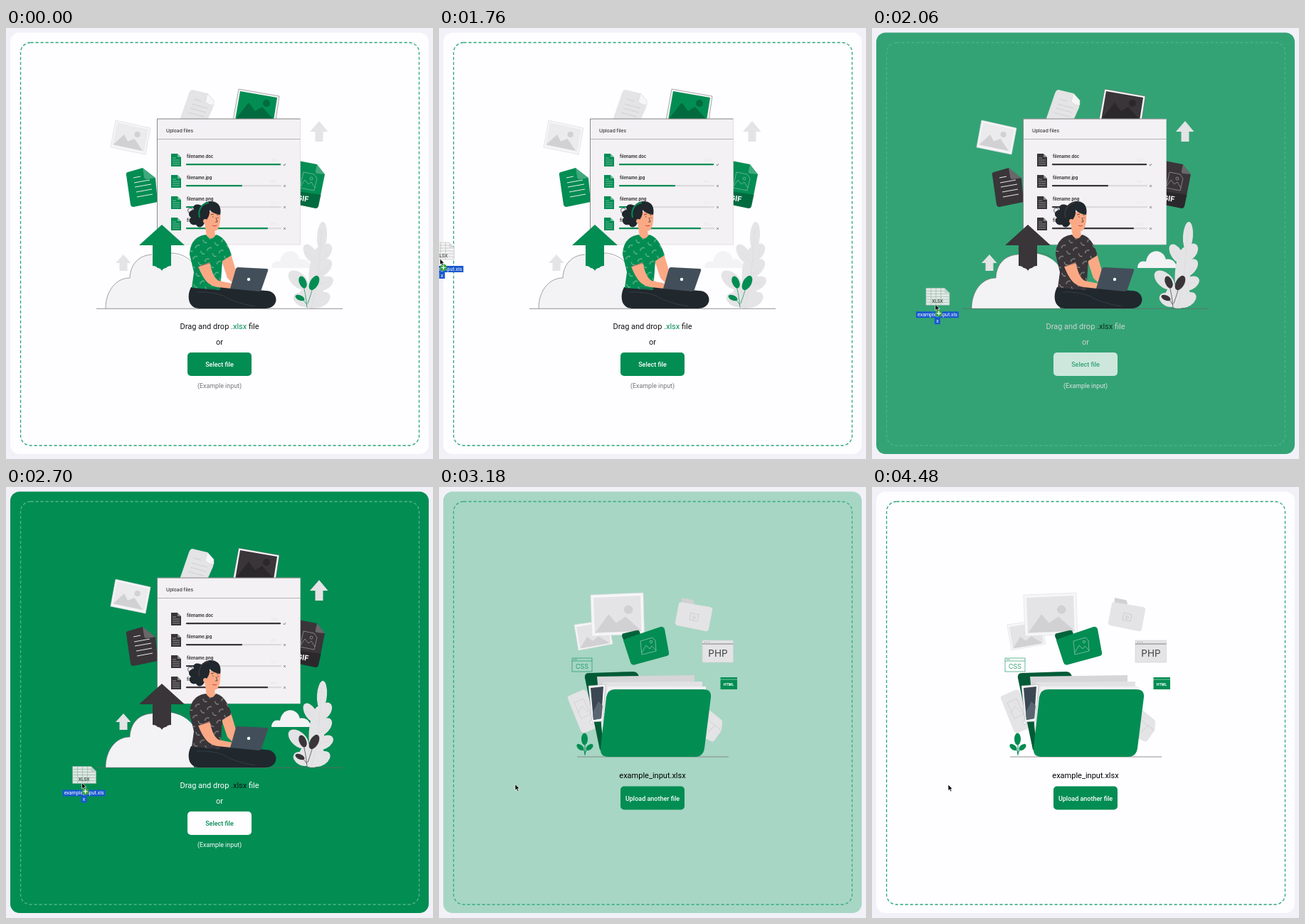
An HTML page that plays this animation: 600 px wide and 607 px high, repeating every 4.51 s.

```html
<!DOCTYPE html>
<html lang="en">
<head>
<meta charset="utf-8">
<title>File drop zone</title>
<style>
html, body { margin: 0; width: 100%; height: 100%; overflow: hidden; background: #f2f1f8; }
svg { display: block; width: 600px; height: 607px; font-family: Roboto, sans-serif; }
.mid { text-anchor: middle; }
.line { font-size: 11px; }
.btn { font-size: 9px; font-weight: 500; }
.geo { font-family: Inter, sans-serif; }
.a { fill: var(--accent); }
.as { stroke: var(--accent); }
.g { fill: #e4e3e5; }
.d { fill: #d1d0d3; }
.w { fill: #f6f5f7; }
.k { fill: #20272d; }
.s { fill: #fba985; }
.n { fill: none; }
</style>
</head>
<body>
<svg viewBox="0 0 600 607">
  <defs>
    <pattern id="curls" width="17" height="16" patternUnits="userSpaceOnUse" patternTransform="rotate(12)">
      <path class="n" d="M2 8a4 4 0 0 1 5-5M10 10a4 4 0 0 0 6 3" stroke="#d5ded8" stroke-width=".7"/>
    </pattern>
    <g id="scene">
      <path class="d" d="M0 30L13 12L20 21L29 15L44 30Z"/>
      <circle class="d" cx="32" cy="8" r="4.3"/>
    </g>
  </defs>
  <rect id="panel" x="6" y="6.500" width="588" height="593.500" rx="13"/>
  <rect id="dash" class="n" x="20.500" y="20.500" width="560" height="567.500" rx="14" stroke-width="1.300" stroke-dasharray="4.200 2.800"/>

  <g id="before">
    <path class="w" stroke="#dcdbde" stroke-width=".7" d="M154 130L203 141L196 178L147 168Z"/>
    <path fill="#ebeaec" d="M156 133L200 143L194 174L150 165Z"/>
    <use href="#scene" transform="matrix(.94 .2 -.18 .94 156 136)"/>

    <path class="g" d="M262 87L283 92L292 102L291 112L283 130H244L257 92Q259 87 262 87Z"/>
    <path class="w" stroke="#ccc" stroke-width=".5" d="M283 92L280 104Q285 109 292 109V102Z"/>
    <path class="n" stroke="#d0cfd2" d="M264 100L274 103M261 107L283 113M259 113L281 119M256 119L278 125"/>

    <path class="w" stroke="#555" stroke-width=".5" d="M327 86L384 96L379 130H319Z"/>
    <path class="a" d="M329 89L381 98L376 130H322Z"/>
    <g fill="#000" opacity=".24">
      <path d="M322 129L341 105L350 117L360 111L376 129Z"/>
      <circle cx="366" cy="106" r="5"/>
    </g>
    <path class="g" d="M440 131L452.500 146H445.500V160H434.500V146H427Z"/>

    <path class="a" d="M171 203L192 197L210 211L213 245L179 252Q176 252 175 249L169 207Q168 204 171 203Z"/>
    <path fill="#fff" opacity=".25" d="M192 197L210 211L198 213Q194 213 194 209Z"/>
    <path class="n" stroke="#e8ece9" d="M179 211L189 209M180 218L202 214M181 224L204 220M183 231L205 227M184 238L206 234"/>

    <path class="a" d="M411 187L437 192L448 206L439 251Q438 254 435 254L411 249Z"/>
    <path fill="#000" opacity=".24" d="M411 230L443 235L439 251Q438 254 435 254L411 249Z"/>
    <path fill="#fff" opacity=".25" d="M437 192L448 206L437 205Q434 204 435 201Z"/>
    <path class="n" stroke="#c5cfc9" stroke-width=".5" d="M418 203L433 206L437 212L433 229L413 225ZM414 223L420 214L425 220L429 217L434 225"/>
    <circle class="n" cx="429" cy="212" r="2" stroke="#c5cfc9" stroke-width=".5"/>
    <text class="geo" transform="translate(408 242.500)rotate(8)" font-size="10.500" font-weight="700" fill="#fff">GIF</text>

    <rect x="212.500" y="128" width="201" height="177" fill="#f3f1f4" stroke="#d2d1d4" stroke-width=".6"/>
    <path class="n" stroke="#666" stroke-width=".7" d="M212.500 305V128H413.500"/>
    <path stroke="#999" stroke-width=".7" d="M212.500 156.500H413.500"/>
    <text class="geo" x="225" y="147" font-size="6.700" font-weight="500" fill="#333">Upload files</text>
    <g id="rows"></g>

    <path fill="#f3f2f4" d="M373 338C373 330 379 327 385 329C388 310 409 310 413 326C421 324 428 330 428 338Z"/>
    <g id="bush" class="g"></g>
    <path class="n" stroke="#d6d5d8" stroke-width=".5" d="M444 282C440 320 440 360 429 394M440 330L452 318M438 348L453 337M436 362L454 358M437 330L422 315M431 376L405 351"/>
    <path class="n as" stroke-width=".7" d="M423 394C422 381 420 370 417 360M424 388Q429 374 432 362M423 390Q420 384 413 380"/>
    <g id="sprig" class="a"></g>

    <path fill="#f3f2f4" d="M140 395C140 371 154 352 174 352C175 331 188 320 205 319C231 313 252 320 264 337V395Z"/>
    <path class="n" stroke="#666" stroke-width=".6" d="M140 395C140 371 154 352 174 352C175 331 188 320 205 319M232 317C244 317 256 323 262 331"/>
    <path class="a" d="M219 277L251 306H232V335Q227 335 225 338Q221 338 219 342Q217 338 213 338Q211 335 206 335V306H187Z"/>
    <path class="g" d="M165 319L175.500 331H170.500V342H159.500V331H154Z"/>
    <path stroke="#666" stroke-width=".7" d="M127 395.300H473"/>

    <path class="k" d="M260 365C253 379 257 395 271 395H364C385 395 384 370 365 370L310 365Z"/>
    <path class="n" stroke="#4a545c" stroke-width=".5" d="M268 372Q290 371 305 377Q320 387 350 392"/>
    <path class="k" d="M275 250C267 246 261 250 264 256C256 257 255 264 260 267C255 272 260 279 267 277C270 283 277 281 279 274L283 262Z"/>
    <circle class="n" cx="259" cy="257" r="3.500" stroke="#20272d" stroke-width=".7"/>
    <path class="s" d="M279 274L282 294Q288 302 294 293L293 285Z"/>
    <path class="s" d="M279 260L301 257Q302 269 300 277Q298 287 291 286Q283 284 279 273Z"/>
    <path class="k" d="M272 267C268 255 277 244 287 244C299 244 303 252 301 263C294 262 288 259 286 256C287 264 283 268 281 272Q276 277 272 267Z"/>
    <path class="n as" stroke-width="2" d="M272 267C269 255 276 247 285 246"/>
    <circle class="s" cx="280" cy="272" r="3"/>
    <path class="n" stroke="#333" stroke-width=".8" d="M288 263L292 262M296 263L299 263M290 266H291.500M297 267H298.500M295 267L297 273L294 273"/>
    <path class="n" stroke="#c9434b" d="M290 278Q293 280 296 278"/>
    <path class="s" d="M302 325L316 318L324 345L319 360L311 352Z"/>
    <path id="shirt" class="a" d="M281 291C267 293 259 301 258 319L264 344L261 366L301 369L304 328L317 320C312 304 305 293 295 291Q288 302 281 291Z"/>
    <use href="#shirt" style="--accent:url(#curls)"/>
    <path class="s" d="M270 336L286 330C289 342 292 352 299 356L319 360L316 367L298 365C282 363 276 350 270 336Z"/>
    <path class="n" stroke="#334" stroke-width=".5" d="M270 336L286 331M281 366L318 369"/>
    <path fill="#424f5a" d="M326 337L366 339Q369 339 368 342L359 368Q358 371 355 371L315 367L323 339Q324 337 326 337Z"/>
    <circle cx="341" cy="354" r="2.200" fill="#fff"/>
  </g>

  <g id="prompt" class="mid">
    <text class="line" x="300" y="424"><tspan class="ink">Drag and drop </tspan><tspan id="ext">.xlsx</tspan><tspan class="ink"> file</tspan></text>
    <text class="line ink" x="300" y="446">or</text>
    <rect id="button" x="255" y="457" width="90" height="33" rx="5"/>
    <text id="label" class="btn" x="300" y="476.700">Select file</text>
    <text id="hint" x="300" y="507" font-size="8.900">(Example input)</text>
  </g>

  <g id="after">
    <path stroke="#777" stroke-width=".8" d="M194 380H407"/>
    <path class="w" stroke="#dddce0" stroke-width=".6" d="M190 194L238 187L244 221L196 230Z"/>
    <path class="g" d="M193 197L236 190L241 219L198 227Z"/>
    <use href="#scene" transform="matrix(.95 -.17 .15 .82 194 203)"/>
    <path class="w" stroke="#dddce0" stroke-width=".6" d="M213 152L287 149L288.500 207L215 210Z"/>
    <path class="g" d="M217 156L283 153L284.500 203L219 206Z"/>
    <use href="#scene" transform="matrix(1.480 -.05 .04 1.400 218.500 163)"/>

    <path class="d" d="M341 156L356 159Q359 160 359 166L340 170Z"/>
    <path class="g" d="M339 162L381 169Q385 170 384 174L379 200Q378 204 374 203L335 195Q331 194 332 190L337 164Z"/>
    <path class="n" stroke="#c5c4c7" stroke-width=".7" d="M354 177L365 180L363 189L352 187ZM357 181L361 184L357 186Z"/>

    <path fill="#00633a" d="M257 210Q257 206 260 206L277 202Q281 201 282 204L285 214L262 222Z"/>
    <path class="a" d="M264 213L311 197Q315 196 317 200L323 233Q324 237 320 238L276 250Q271 252 269 247L259 216Z"/>
    <path class="n" stroke="#b6d9c7" stroke-width=".6" d="M283 217L300 212L304 216L305 231L285 236ZM285 233L291 223L296 228L299 224L305 230"/>
    <circle class="n" cx="298" cy="218" r="1.700" stroke="#b6d9c7" stroke-width=".6"/>

    <rect class="g" x="370" y="216" width="43.500" height="31" stroke="#cfced1" stroke-width=".6"/>
    <path stroke="#555" stroke-width=".7" d="M370 221H413.500M373 218.500H374M376 218.500H377M379 218.500H380"/>
    <text class="geo mid" x="392" y="239" font-size="13.500" fill="#444">PHP</text>
    <g class="n as" stroke-width=".6">
      <rect x="187" y="241" width="28" height="19"/>
      <path d="M187 245H215M189 243H194"/>
    </g>
    <text class="geo mid a" x="201" y="255.500" font-size="9" font-weight="300">CSS</text>
    <rect class="a" x="395.500" y="268" width="23.500" height="17"/>
    <path stroke="#fff" stroke-width=".5" d="M395.500 271H419"/>
    <text class="geo mid" x="407" y="280" font-size="5" font-weight="700" fill="#fff">HTML</text>

    <path class="g" d="M183 294L201 286Q205 284 208 289L225 338L205 346Q201 347 199 343L181 298Q180 295 183 294Z"/>
    <path class="n" stroke="#cfced1" stroke-width=".8" d="M190 304L203 298L213 320L200 326ZM195 318L201 309L209 317"/>
    <circle class="w" cx="215" cy="331" r="3" stroke="#bbb" stroke-width=".6"/>
    <path class="g" d="M380 314L397 328Q399 330 398 333L397 343L387 357Q385 360 382 358L374 354Z"/>
    <path class="n" stroke="#c9c8cb" stroke-width=".7" d="M379 329L388 336L397 343M388 336L377 346"/>
    <path fill="#005b36" d="M205 269Q204 262 211 262L273 260Q279 260 281 267L300 280L235 375L226 370Z"/>
    <path fill="#d6d5d8" d="M222 267L359 265V300L240 365L229 345Z"/>
    <path fill="#e2e1e4" d="M230 275L370 274V310L236 360Z"/>
    <path fill="#f0eff2" d="M228 332L237 281L375 281V310L232 370Z"/>
    <path class="w" stroke="#999" stroke-width=".4" d="M210 280L234 278L230 330L215 331Z"/>
    <path fill="#3b4853" d="M213 283L231 281L228 326L217 328Z"/>
    <path fill="#596570" d="M216 317L224 302L230 308L228 326L217 328Z"/>
    <path class="a" d="M247 285H371Q383 285 382 296L373 368Q371 380 360 380H238Q226 380 227 368L235 296Q237 285 247 285Z"/>
    <path class="n as" d="M205 378V360M205 376Q205 370 199 367M205 376Q206 370 211 367"/>
    <g id="shoot" class="a"></g>
    <text class="line mid" x="300" y="410">example_input.xlsx</text>
    <rect class="a" x="255" y="421.500" width="90" height="33" rx="5"/>
    <text class="btn mid" x="300" y="441.500" fill="#fff">Upload another file</text>
  </g>

  <g id="pointer">
    <g id="file">
      <g opacity=".9">
        <path fill="#f3f3f3" stroke="#aaa" stroke-width=".5" d="M-13-23H13L20-16V1H-13Z"/>
        <path class="n" stroke="#aeb5b1" stroke-width=".7" d="M-12-19H14M-12-15H19M-12-11H19M-12-7H19M-12-3H19M-6-23V1M1-23V1M8-23V1"/>
        <path fill="#d5d5d5" d="M13-23V-16H20Z"/>
        <rect x="-6" y="-8" width="18" height="7" fill="#dfe3e0"/>
        <text class="mid" x="3" y="-2" font-size="6.500" fill="#222">XLSX</text>
      </g>
      <path fill="#1959cf" d="M-27 10H33V19H7V28H-1V19H-27Z"/>
      <text class="mid" x="3" y="17" font-size="7" fill="#fff">example_input.xls<tspan x="3" y="26">x</tspan></text>
      <circle cx="5" cy="12.500" r="5" fill="#35a045"/>
      <path stroke="#fff" stroke-width="1.200" d="M2 12.500H8M5 9.500V15.500"/>
    </g>
    <path stroke="#fff" stroke-width=".7" d="M0 0V8.500L2 6.800L3.400 10L5 9.300L3.600 6.200H6.200Z"/>
  </g>
</svg>
<script>
const LOOP = 4510, ENTER = 1810, DROP = 2990, FADE = 500;
const GREEN = [2, 141, 83], WHITE = [254, 253, 255], BLACK = [20, 20, 20];
const $ = id => document.getElementById(id);

const leaves = list => list.map(([x, y, rx, ry, turn]) =>
  `<ellipse rx="${rx}" ry="${ry}" transform="translate(${x} ${y})rotate(${turn})"/>`).join('');
$('bush').innerHTML = leaves([
  [444, 293, 7, 20, 4], [447, 316, 9, 14, 38], [428, 318, 8, 15, -32], [446, 338, 9, 15, 42],
  [437, 342, 11, 34, 6], [411, 355, 10, 17, -48], [446, 360, 9, 15, 62], [430, 378, 18, 17, 10],
  [416, 383, 9, 13, -62], [443, 383, 9, 14, 55]]);
$('sprig').innerHTML = leaves([[417, 358, 5, 9, -22], [433, 359, 6, 11, 28], [413, 380, 3.5, 7, -65]]);
$('shoot').innerHTML = leaves([[204.5, 355, 4.5, 8.5, 0], [198.5, 366.5, 3.5, 6, -50], [211.5, 366.5, 3.5, 6, 50]]);

$('rows').innerHTML = [['doc', 386], ['jpg', 332], ['png', 270], ['gif', 368]].map(([type, end], i) => `
  <g transform="translate(0 ${i * 30})">
    <path class="a" d="M232 177H241L246 182V195H232Z"/>
    <path fill="#fff" opacity=".4" d="M241 177V182H246Z"/>
    <path stroke="#dfe5e2" stroke-width=".5" d="M234 183H239M234 186H244M234 189H244M234 192H244"/>
    <text class="geo" x="254" y="183" font-size="5.900" font-weight="600" fill="#222">filename.${type}</text>
    <text x="372" y="188" font-size="4.500" fill="#e3e2e5">${['100%', '60%', '12 %', '85 %'][i]}</text>
    <path stroke="#dbdadd" stroke-width="2.200" stroke-linecap="round" d="M254 192.200H386"/>
    <path class="as" stroke-width="2.200" stroke-linecap="round" d="M254 192.200H${end - 1}"/>
    <path class="n" stroke="#444" stroke-width=".6" d="${i ? 'M390 191L393 194M393 191L390 194' : 'M390 192L391 194L393 191'}"/>
  </g>`).join('');

// CSS "ease": cubic-bezier(.25, .1, .25, 1)
function ease(x) {
  if (x <= 0 || x >= 1) return x <= 0 ? 0 : 1;
  let lo = 0, hi = 1, u;
  for (let i = 0; i < 18; i++) {
    u = (lo + hi) / 2;
    if (.75 * u * (1 - u) + u ** 3 < x) lo = u; else hi = u;
  }
  return .3 * u * (1 - u) ** 2 + 3 * u * u * (1 - u) + u ** 3;
}
const rgb = color => `rgb(${color.map(Math.round)})`;
const mix = (a, b, p) => rgb(a.map((v, i) => v + (b[i] - v) * p));
const show = (id, on) => $(id).style.display = on ? '' : 'none';

function draw(t) {
  const over = t >= ENTER, dropped = t >= DROP;
  const p = ease((t - ENTER) / FADE) - ease((t - DROP) / FADE);
  const paint = (id, from, to, prop = 'fill') => $(id).style[prop] = mix(from, to, p);

  paint('panel', WHITE, GREEN);
  paint('dash', [40, 168, 118], [82, 181, 139], 'stroke');
  paint('ext', GREEN, BLACK);
  paint('button', GREEN, WHITE);
  paint('label', WHITE, GREEN);
  paint('hint', [115, 115, 118], WHITE);
  for (const el of document.querySelectorAll('.ink')) el.style.fill = mix(BLACK, WHITE, p);
  document.body.style.setProperty('--accent', over && !dropped ? '#393539' : rgb(GREEN));

  show('before', !dropped);
  show('prompt', !dropped);
  show('after', dropped);
  show('file', !dropped);
  show('pointer', t > 1640);
  const x = 107 - 44 * Math.exp((1910 - t) / 170);
  const y = 419 - 53 * Math.exp((1910 - t) / 260);
  $('pointer').setAttribute('transform', `translate(${x} ${y})`);
}

const start = performance.now();
(function tick() {
  draw((performance.now() - start) % LOOP);
  requestAnimationFrame(tick);
})();
</script>
</body>
</html>
```
